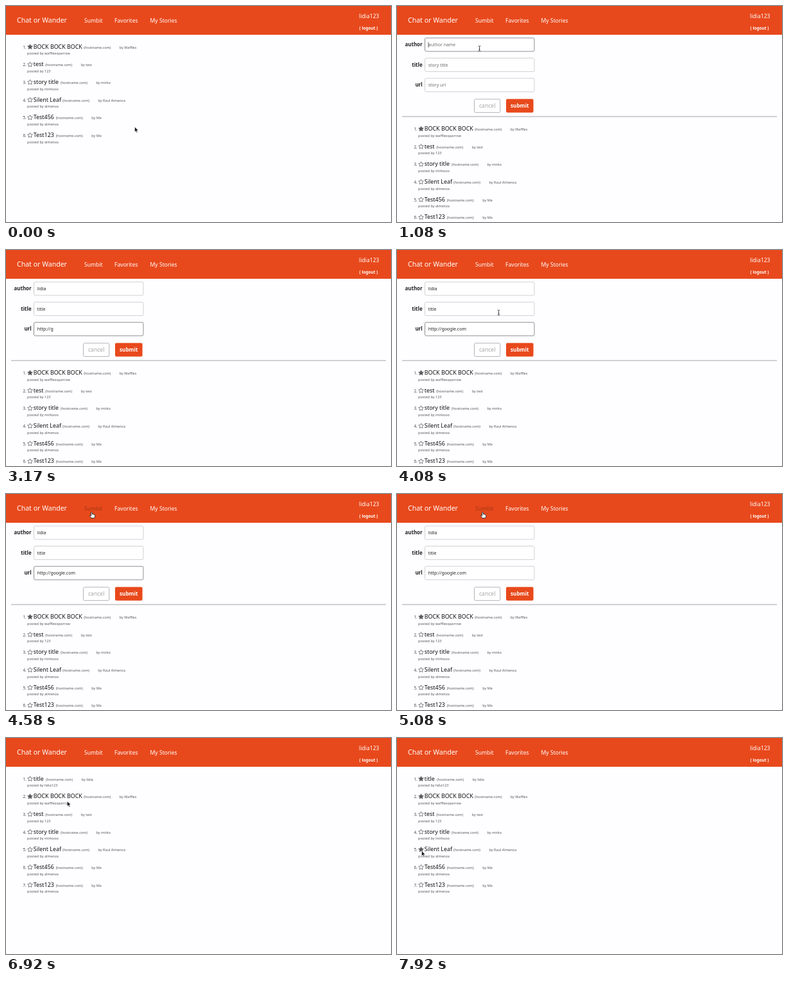
Recreate the animation shown at these times as an HTML page. Size 600x338 px, loop 8000 ms.

```html
<!DOCTYPE html>
<html lang="en">
<head>
<meta charset="utf-8">
<title>Story list</title>
<style>
  html, body { margin: 0; height: 100%; overflow: hidden; background: #fefdff; }
  svg { display: block; width: 100vw; height: 100vh; }
  text { font-family: "Noto Sans", "Open Sans", sans-serif; white-space: pre; }
</style>
</head>
<body>
<svg viewBox="0 0 600 338">
  <g id="page"></g>
  <g id="cursor">
    <path id="arrow" d="M0 0V8.3L1.9 6.6L3.2 9.5L4.6 8.9L3.3 6.1H5.9Z" fill="#111" stroke="#fff" stroke-width=".7"/>
    <path id="beam" d="M-1.8 -4Q0 -4 0 -2.8Q0 -4 1.8 -4M0 -2.8V2.8M-1.8 4Q0 4 0 2.8Q0 4 1.8 4M-1 1.2H1" fill="none" stroke="#222" stroke-width=".8"/>
    <path id="hand" d="M-.9 .7Q0 -.4 .9 .7V3.6Q2 3 2.6 3.9Q3.6 3.4 4.1 4.3Q5.2 4.1 5.2 5.2V7.2L4.2 9.7H-.6L-3 6.2Q-3.2 4.9 -1.9 5.4L-.9 6.3Z" fill="#fff" stroke="#111" stroke-width=".8"/>
  </g>
</svg>
<script>
const LOOP = 8000;
const OPEN = 640, CLOSE = 4670, REOPEN = 5080, POSTED = 5920;
const FOCUS = 1000, STAR_TITLE = 7250, STAR_LEAF = 7840;
const ORANGE = '#e8491c';
const $ = id => document.getElementById(id);

// title, x of host name, author, poster
const stories = [
  ['BOCK BOCK BOCK', 121.3, 'Waffles', 'wafflessparrow'],
  ['test', 61.2, 'test', '123'],
  ['story title', 85, 'mirko', 'mirkooo'],
  ['Silent Leaf', 88, 'Raul Almenza', 'almenza'],
  ['Test456', 77.7, 'Me', 'almenza'],
  ['Test123', 77.7, 'Me', 'almenza']
];
const added = ['title', 62.2, 'lidia', 'lidia123'];

// label, placeholder, value, time of focus, first key, ms per key, top
const fields = [
  ['author', 'author name', 'lidia', FOCUS, 1250, 90, 50],
  ['title', 'story title', 'title', 1830, 1920, 75, 81.6],
  ['url', 'story url', 'http://google.com', 2300, 2580, 80, 113.2]
];

// time, x, y of the pointer
const moves = [
  [0, 200.5, 189], [150, 200.5, 189], [560, 133.5, 28], [700, 133.5, 28],
  [960, 128.5, 66.5], [1250, 128.5, 66.5], [3900, 158.5, 98], [4120, 158.5, 98],
  [4500, 133.5, 28], [5200, 133.5, 28], [5680, 180.5, 150], [6650, 180.5, 150],
  [7130, 37.5, 64], [7400, 37.5, 64], [7740, 38.3, 176.5], [LOOP, 38.3, 176.5]
];

const text = (x, y, size, fill, str, extra = '') =>
  `<text x="${x}" y="${y}" font-size="${size}" fill="${fill}" ${extra}>${str}</text>`;

const box = (x, y, w, h, fill, stroke, extra = '') =>
  `<rect x="${x}" y="${y}" width="${w}" height="${h}" rx="2" fill="${fill}" stroke="${stroke}" ${extra}/>`;

function star(x, y, full) {
  const pts = Array.from({ length: 10 }, (_, i) => {
    const a = Math.PI * i / 5, r = i % 2 ? 1.95 : 4.1;
    return (x + r * Math.sin(a)).toFixed(2) + ',' + (y - r * Math.cos(a)).toFixed(2);
  });
  return `<polygon points="${pts.join(' ')}" fill="${full ? '#5a595c' : 'none'}" stroke="#5a595c" stroke-width=".75" stroke-linejoin="round"/>`;
}

function header(hover) {
  const nav = 'font-weight="500"';
  return `<rect width="600" height="45" fill="${ORANGE}"/>` +
    text(17, 26.4, 10.55, '#fff', 'Chat or Wander', nav) +
    text(122, 25.8, 8.6, hover ? '#a43817' : '#fff', 'Sumbit', nav) +
    text(169, 25.8, 8.6, '#fff', 'Favorites', nav) +
    text(224.5, 25.8, 8.6, '#fff', 'My Stories', nav) +
    text(550, 19, 8.6, '#fff', 'lidia123', nav) +
    text(550.5, 37.2, 6.5, '#fff', '( logout )', 'font-weight="600"');
}

function row([title, hostX, author, poster], i, top, full) {
  const y = top + i * 27.67, grey = '#58575a';
  return text(31.6, y, 6.2, '#444', i + 1 + '.', 'text-anchor="end"') +
    star(37.5, y - 2.5, full) +
    text(42.8, y, 8.9, '#111', title) +
    text(hostX, y, 5.5, grey, '(hostname.com)') +
    text(hostX + 55.5, y, 5.5, grey, 'by ' + author) +
    text(33, y + 9.7, 5.55, grey, 'posted by ' + poster);
}

function form(t) {
  const active = t < FOCUS || t >= CLOSE ? -1 : fields.filter(f => t >= f[3]).length - 1;
  let out = '';
  fields.forEach(([label, hint, value, , start, pace, y], i) => {
    const n = Math.max(0, Math.min(value.length, Math.floor((t - start) / pace) + 1));
    const on = i === active;
    out += text(39.6, y + 13.2, 7.9, '#222', label, 'font-weight="700" text-anchor="end"') +
      box(43.5, y, 170.5, 21, '#fff', on ? '#8f8e91' : '#cccbce', `stroke-width="${on ? 1 : .9}"`) +
      text(48.8, y + 13, 6.95, n ? '#222' : '#6e6d70', n ? value.slice(0, n) : hint);
    if (on && !n) out += `<path d="M49 ${y + 6.4}v8.6" stroke="#222" stroke-width=".7"/>`;
  });
  return out +
    box(120.5, 145.8, 40.3, 20.8, '#fff', '#b4b3b6') +
    text(140.7, 159.3, 8.6, '#a5a4a7', 'cancel', 'font-weight="500" text-anchor="middle"') +
    box(170, 145.5, 42.6, 21.3, ORANGE, 'none') +
    text(191.3, 159.3, 8.1, '#fff', 'submit', 'font-weight="700" text-anchor="middle"') +
    '<path d="M8 173H592" stroke="#a3a2a5" stroke-width="1"/>';
}

function pointer(t) {
  const i = Math.max(1, moves.findIndex(m => m[0] > t));
  const [t0, x0, y0] = moves[i - 1], [t1, x1, y1] = moves[i];
  const p = (t - t0) / (t1 - t0), e = p * p * (3 - 2 * p);
  return [x0 + (x1 - x0) * e, y0 + (y1 - y0) * e];
}

let shown = '';
function draw(t) {
  const open = t >= OPEN && t < CLOSE || t >= REOPEN && t < POSTED;
  const [x, y] = pointer(t);
  const onLink = x > 120 && x < 153 && y > 16 && y < 31;
  const onField = open && x > 43 && x < 214 && fields.some(f => y > f[6] && y < f[6] + 21);
  const onButton = open && x > 170 && x < 213 && y > 145 && y < 167;
  const kind = onLink || onButton ? 'hand' : onField ? 'beam' : 'arrow';

  const liked = { 'BOCK BOCK BOCK': true, title: t >= STAR_TITLE, 'Silent Leaf': t >= STAR_LEAF };
  const list = t >= POSTED ? [added, ...stories] : stories;
  const top = open ? 194.9 : 66.5;
  const html = header(onLink) + (open ? form(t) : '') +
    list.map((s, i) => row(s, i, top, liked[s[0]])).join('');
  if (html !== shown) $('page').innerHTML = shown = html;

  $('cursor').setAttribute('transform', `translate(${x.toFixed(2)} ${y.toFixed(2)})`);
  $('cursor').setAttribute('visibility', t > 1250 && t < 4000 ? 'hidden' : 'visible');
  for (const k of ['arrow', 'beam', 'hand']) $(k).style.display = k === kind ? '' : 'none';
}

const began = performance.now();
function tick() {
  draw((performance.now() - began) % LOOP);
  requestAnimationFrame(tick);
}
tick();
</script>
</body>
</html>
```
